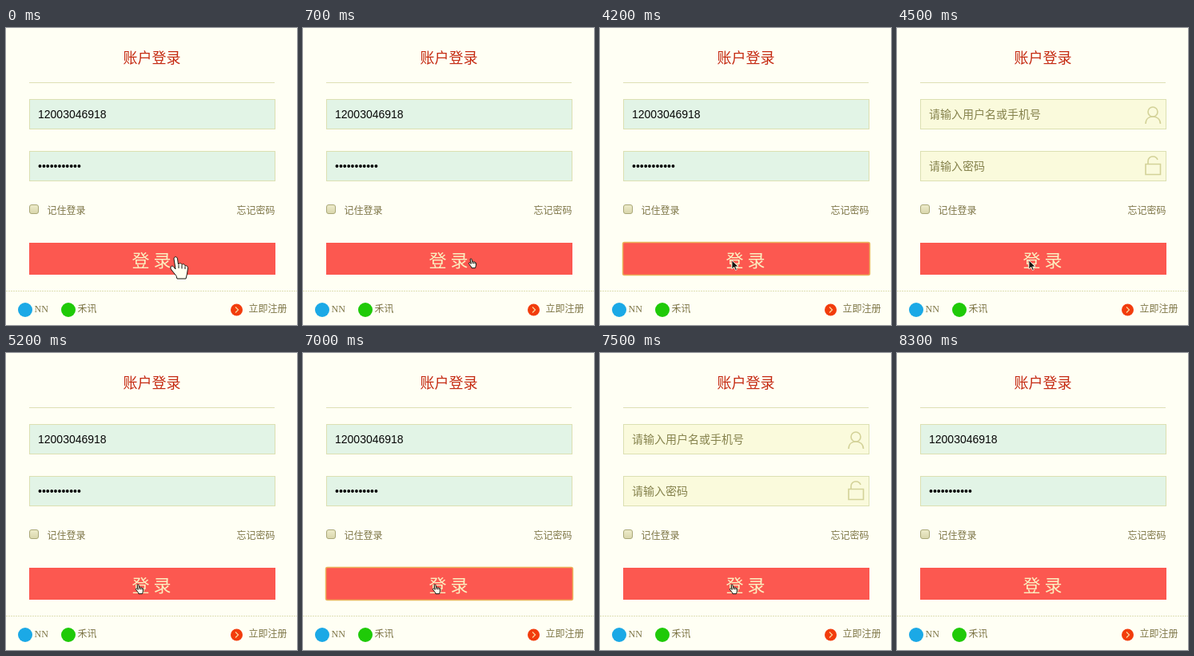
Animation of 364 by 372 pixels, one loop 9.6 s. Source, as an HTML page:

```html
<!DOCTYPE html>
<html lang="zh">
<head>
<meta charset="utf-8">
<title>账户登录</title>
<style>
  html, body { margin: 0; width: 100%; height: 100%; overflow: hidden; background: #fffff4; }
  svg { display: block; width: 364px; height: 372px; }
  text { font-family: "Noto Sans CJK SC", "Noto Sans CJK", sans-serif; white-space: pre; }
  .small { font-size: 12px; fill: #7d7546; }
  .latin { font-family: "Liberation Serif", serif; }
  .hint { font-size: 14px; fill: #85824c; }
  .value { font: 14px "Liberation Sans", Arial, sans-serif; fill: #080808; }
  .rule { stroke: #dedfb5; }
  .field { stroke: #dce0b2; }
  .icon { fill: none; stroke: #d3d298; stroke-width: 1.6; }
  .pointer { fill: #fffff0; stroke: #151510; stroke-linejoin: round; }
  .pointer path { vector-effect: non-scaling-stroke; }
</style>
</head>
<body>
<svg viewBox="0 0 364 372">
  <defs>
    <linearGradient id="box" x2="0" y2="1">
      <stop stop-color="#eeeccb"/>
      <stop offset="1" stop-color="#d9d6ac"/>
    </linearGradient>
  </defs>

  <text x="146.500" y="44" font-size="18" fill="#c52a12">账户登录</text>
  <path class="rule" d="M29 68.500H336"/>

  <g id="empty">
    <g class="field" fill="#fafadc">
      <rect x="29.500" y="89.500" width="307" height="37"/>
      <rect x="29.500" y="154.500" width="307" height="37"/>
    </g>
    <text class="hint" x="40" y="113">请输入用户名或手机号</text>
    <text class="hint" x="40" y="178">请输入密码</text>
    <g class="icon">
      <circle cx="320" cy="105" r="6"/>
      <path d="M311 120C311 114 315 111 320 111S329.500 114 329.500 120"/>
      <path d="M311 170.500H329.500V183.500H311ZM314 170V167A6.200 6.200 0 0 1 326 165"/>
    </g>
  </g>

  <g id="filled">
    <g class="field" fill="#e2f4e6">
      <rect x="29.500" y="89.500" width="307" height="37"/>
      <rect x="29.500" y="154.500" width="307" height="37"/>
    </g>
    <text class="value" x="40" y="113">12003046918</text>
    <text class="value" x="40" y="178">•••••••••••</text>
  </g>

  <rect x="29.500" y="221.500" width="11" height="11" rx="2.500" fill="url(#box)" stroke="#aaa878"/>
  <text class="small" x="51.500" y="232.500">记住登录</text>
  <text class="small" x="288.500" y="232.500">忘记密码</text>

  <rect x="29" y="269" width="308" height="40" fill="#fc5850"/>
  <rect id="focus" x="28.500" y="268.500" width="309" height="41" rx="2" fill="none" stroke="#eab45c" stroke-width="1.500"/>
  <text x="157.500" y="299" font-size="22" fill="#fbefc0">登 录</text>

  <path class="rule" d="M0 329.500H364" stroke-dasharray="2 1"/>
  <circle cx="24" cy="353" r="9" fill="#1ba9e6"/>
  <text class="small latin" x="35.500" y="356">NN</text>
  <circle cx="78" cy="353" r="9" fill="#1fca08"/>
  <text class="small" x="89.500" y="356">禾讯</text>
  <circle cx="288.500" cy="353" r="7.500" fill="#f23c0c"/>
  <path d="M287 349.500L290.500 353L287 356.500" fill="none" stroke="#fbd9a0" stroke-width="1.200"/>
  <text class="small" x="303.500" y="356">立即注册</text>

  <g id="hand" class="pointer">
    <path d="M-2 2C-2-1 2-1 2.500 2L3.500 9C5 7 7.500 7.500 8 9.500C9.500 8 12 9 12 11C14 10 15.500 11.500 15.500 14L14.500 21L13 27H2L1 23.500L-5 16C-8 12-4 9.500-2 12.500L0 15Z"/>
    <path d="M4 9.500V14M8 10V14.500M12 11.500V15" fill="none"/>
  </g>
  <path id="arrow" d="M0 0V11L2.700 8.500L4.500 12.500L6.300 11.700L4.600 7.900H8Z" fill="#151510" stroke="#fffff0" stroke-width=".8"/>
</svg>
<script>
  const LOOP = 9600;
  const SMALL = 0.43;
  const part = id => document.getElementById(id);
  const show = (id, on) => part(id).setAttribute("visibility", on ? "visible" : "hidden");

  // Form states: [start, fields filled, button focused]
  const formSteps = [
    [0, true, false], [3700, true, true], [4400, false, false],
    [5100, true, false], [7000, true, true], [7400, false, false], [8000, true, false]
  ];

  // Pointer poses: [start, kind, x, y, scale]
  const pointerSteps = [
    [0, "hand", 212, 287, 1], [100, "hand", 213, 286, 1.12], [200, "hand", 213, 286, 1.2],
    [600, "hand", 212, 287, 0.8], [700, "hand", 210, 289, SMALL],
    ...[201, 192, 183, 175, 168, 163, 163, 165].map((x, i) => [2700 + i * 100, "hand", x, 290, SMALL]),
    [4200, "arrow", 165, 291, 1], [4800, "hand", 165, 290, SMALL],
    [8000, "hand", 165, 300, SMALL], [8100, "hand", 167, 325, SMALL],
    [8200, "hand", 169, 355, SMALL], [8300, "none", 0, 0, 1]
  ];

  const stepAt = (steps, time) => steps.findLast(step => step[0] <= time);

  function draw(time) {
    const [, filled, focused] = stepAt(formSteps, time);
    show("filled", filled);
    show("empty", !filled);
    show("focus", focused);

    const [, kind, x, y, scale] = stepAt(pointerSteps, time);
    for (const id of ["hand", "arrow"]) show(id, id === kind);
    if (kind !== "none") part(kind).setAttribute("transform", `translate(${x} ${y}) scale(${scale})`);
  }

  const start = performance.now();
  function tick() {
    draw((performance.now() - start) % LOOP);
    requestAnimationFrame(tick);
  }
  tick();
</script>
</body>
</html>
```
